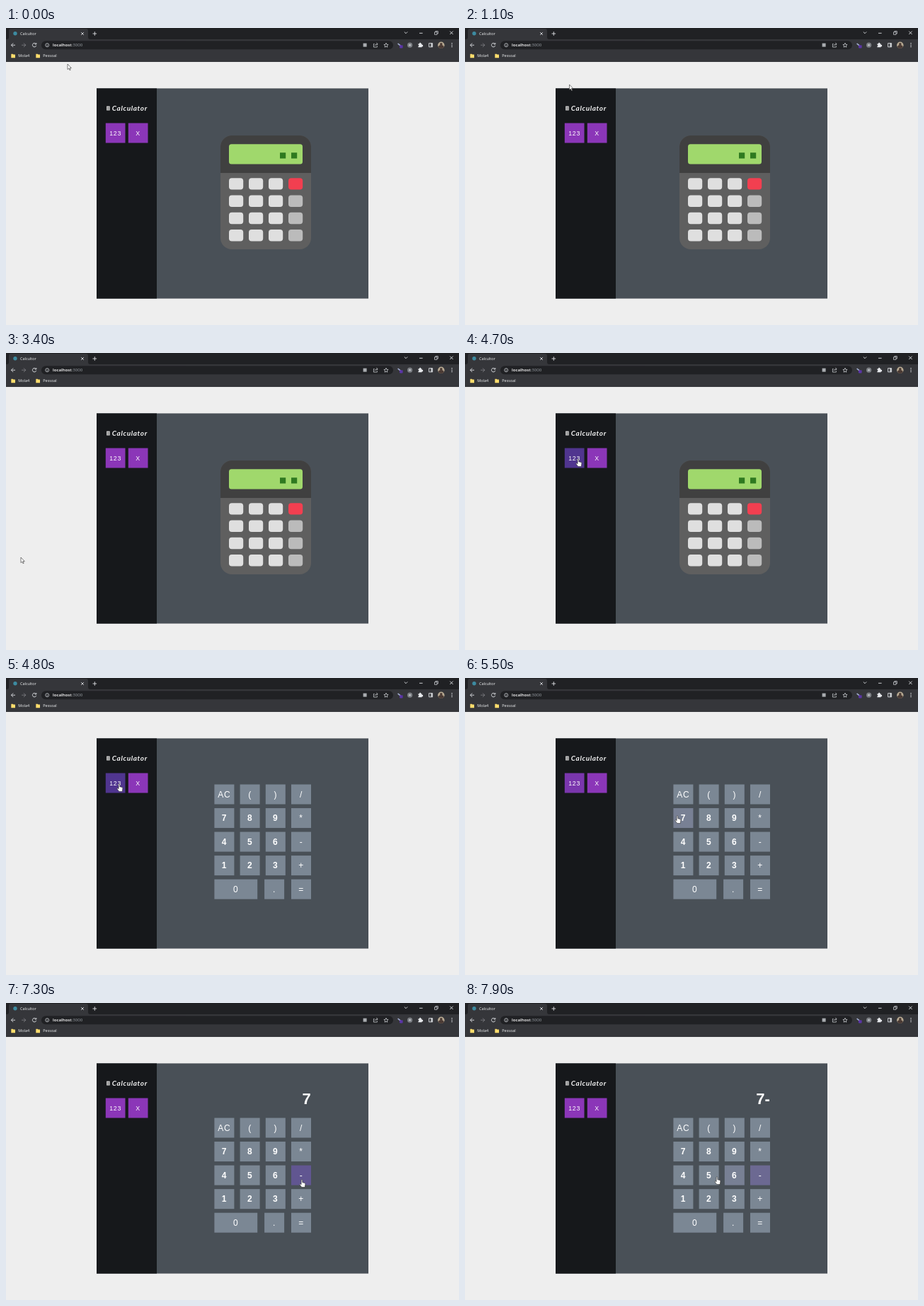
An HTML page for the animation above (8 s loop, 640 px wide and 420 px high).

```html
<!DOCTYPE html>
<html lang="en">
<head>
<meta charset="utf-8">
<title>Calculator</title>
<style>
html, body { margin: 0; width: 100%; height: 100%; overflow: hidden; background: #eee; }
svg { display: block; width: 640px; height: 420px; }
.ui { font: 500 5.5px "Open Sans", "Noto Sans", sans-serif; fill: #f1f3f4; }
.url { font-size: 6.1px; font-weight: 600; fill: #fff; }
.icon { fill: none; stroke: #dfe1e5; stroke-width: .9; }
.logo { font: italic 700 10px Lato, sans-serif; letter-spacing: .65px; fill: #f2f2f2; }
.btn { font-family: "Liberation Sans", Arial, sans-serif; fill: #fff; text-anchor: middle; letter-spacing: .7px; }
.display { font: 700 22px "Liberation Sans", Arial, sans-serif; fill: #fff; text-anchor: end; }
</style>
</head>
<body>
<svg viewBox="0 0 640 420">
  <rect width="640" height="420" fill="#eee"/>

  <!-- browser window -->
  <rect width="640" height="48" fill="#35363a"/>
  <rect width="640" height="16" fill="#202124"/>
  <path d="M1 16Q4 16 4 13V4Q4 1 7 1H113Q116 1 116 4V13Q116 16 119 16Z" fill="#35363a"/>
  <circle cx="13" cy="7.8" r="2.7" fill="#3d8ba1"/>
  <rect x="50" y="18.2" width="497" height="12" rx="6" fill="#202124"/>
  <g class="ui">
    <text x="20" y="9.8">Calcultor</text>
    <text class="url" x="66" y="26.2">localhost<tspan fill="#9aa0a6" font-weight="400">:3000</tspan></text>
    <text x="17.3" y="41.3">Mola4</text>
    <text x="52.3" y="41.3">Pessoal</text>
  </g>
  <g fill="#fbdc6c">
    <path id="folder" d="M7.3 36.8H9.8L10.6 37.6H13V42.2H7.3Z"/>
    <use href="#folder" x="35"/>
  </g>
  <g class="icon">
    <path d="M106.2 6.2L109.8 9.8M109.8 6.2L106.2 9.8M125.3 5.2V10.8M122.5 8H128.1"/>
    <path d="M562.8 5.5L565 7.7L567.2 5.5M584 7.3H588.6M627.2 4.6L631.6 9M631.6 4.6L627.2 9"/>
    <path d="M605.5 5.8H609V9.3H605.5ZM606.8 5.6V4.5H610.3V8H609.2" stroke-width=".7"/>
    <path id="back" d="M13 24.2H7.6M10.2 21.4L7.4 24.2L10.2 27"/>
    <use href="#back" transform="translate(35.2) scale(-1 1)" opacity=".4"/>
    <path d="M42.2 22.4A2.7 2.7 0 1 0 42.7 24.9M42.8 21V23H40.6"/>
    <circle cx="58.2" cy="24.2" r="2.5" stroke-width=".7"/>
    <path d="M58.2 23.9V25.7M58.2 22.6V23.2" stroke-width=".7"/>
    <path d="M520.6 22.4H519.4V27H524.4V25.4M521 25Q521.4 22.8 525 22.7M523.4 21L525.2 22.7L523.4 24.4" stroke-width=".7"/>
    <path d="M537 21.2L537.9 23.3L540.1 23.5L538.4 25L538.9 27.2L537 26L535.1 27.2L535.6 25L533.9 23.5L536.1 23.3Z" stroke-width=".7"/>
    <path d="M597.6 21.6H602.6V26.8H597.6ZM600.8 21.6V26.8M601.7 21.6V26.8"/>
  </g>
  <rect x="504.6" y="21.6" width="5" height="5" fill="#a9acb0"/>
  <path d="M553 22.3L554.2 21.4L558 24.6L556.8 25.7Z" fill="#a8b4d8"/>
  <rect x="556" y="24.3" width="4.6" height="4.2" rx="1" fill="#5a35a5"/>
  <circle cx="570.6" cy="24.2" r="3.6" fill="#7c7f84"/>
  <circle cx="570.6" cy="24.2" r="1.4" fill="#bfc2c6"/>
  <path d="M582.4 22.3H584.1A1.1 1.1 0 1 1 586.2 22.3H587.6V24A1.1 1.1 0 1 1 587.6 26V27.3H582.4V25.8A1 1 0 0 0 582.4 23.8Z" fill="#e8eaed"/>
  <circle cx="614.8" cy="24.2" r="4.7" fill="#b7a992"/>
  <path d="M611 27A3.8 3 0 0 1 618.6 27A4.7 4.7 0 0 1 611 27Z" fill="#4a3a34"/>
  <circle cx="614.8" cy="22.8" r="1.8" fill="#4a3a34"/>
  <path d="M630 21.8V26.8" stroke="#dfe1e5" stroke-width="1.5" stroke-linecap="round" stroke-dasharray="0 2.4"/>

  <!-- app -->
  <rect x="128" y="85.4" width="384" height="297.2" fill="#495057"/>
  <rect x="128" y="85.4" width="85" height="297.2" fill="#16181b"/>
  <rect x="142" y="110.6" width="4.8" height="5.8" rx=".5" fill="#c9c9c9"/>
  <path d="M142.6 112.6H146.2M142.6 114.6H146.2" stroke="#444" stroke-width=".6"/>
  <text class="logo" x="149.8" y="117">Calculator</text>
  <g id="menu"></g>

  <g id="picture">
    <rect x="303" y="152" width="128" height="161" rx="16" fill="#5f5f5f"/>
    <path d="M303 205V168A16 16 0 0 1 319 152H415A16 16 0 0 1 431 168V205Z" fill="#404040"/>
    <rect x="315" y="164.2" width="104" height="28.4" rx="3.5" fill="#a0d86c"/>
    <path d="M387 176.2H395.2V184.4H387ZM403 176.2H411.2V184.4H403Z" fill="#2f7a20"/>
  </g>
  <g id="pad"></g>
  <text class="display" id="display" x="430.8" y="143.2"></text>

  <g id="cursor" stroke="#2b2b2b" stroke-width=".6" fill="#fff" stroke-linejoin="round">
    <path id="arrow" d="M0 0V7.6L1.8 6L3 8.7L4.2 8.2L3 5.6H5.3Z"/>
    <path id="hand" d="M-.9 .6A.85 .85 0 0 1 .8 .6V3.7L4 4.5Q5.1 4.9 4.9 6.1L4.3 10.6H-.2L-3 6.9Q-3.3 5.8-2.3 5.7L-.9 6.7Z"/>
  </g>
</svg>
<script>
const LOOP = 8000, STEP = 100, FADE = 500;
const PAD_SHOWN = 4800, FIRST_DIGIT = 6400, MINUS = 7400;
const GREY = [123, 135, 148], PURPLE = [139, 54, 184], HOVER = [80, 53, 143];

// The pointer rests between eased moves: start, end, x, y.
const home = [87, 51];
const moves = [
  [100, 500, 106, 50], [600, 800, 150, 79], [1000, 1200, 145, 81],
  [1500, 2000, 313, 121], [2000, 2600, 312, 76], [2700, 2800, 15, 222],
  [2900, 3100, 21, 289], [3400, 4200, 160, 150], [4900, 5100, 165, 157],
  [5100, 5500, 300, 195], [5500, 5800, 309, 204], [6600, 7100, 418, 250],
  [7500, 7600, 398, 250], [7800, 7900, 356, 246]
];

const $ = id => document.getElementById(id);

function add(parent, tag, attrs, text = "") {
  const el = document.createElementNS("http://www.w3.org/2000/svg", tag);
  for (const name in attrs) el.setAttribute(name, attrs[name]);
  el.textContent = text;
  return parent.appendChild(el);
}

function button(parent, label, x, y, w, size, color, inPad) {
  const h = 28;
  const box = add(parent, "rect", { x, y, width: w, height: h });
  add(parent, "text", {
    class: "btn", x: x + w / 2, y: y + h / 2 + size * .35,
    "font-size": size, "font-weight": inPad && /[1-9]/.test(label) ? 700 : 400
  }, label);
  return { x, y, w, h, box, color, inPad };
}

for (let i = 0; i < 16; i++) {
  const col = i % 4, row = i >> 2;
  add($("picture"), "rect", {
    x: 315 + col * 28, y: 212.2 + row * 24.3, width: 20.2, height: 16.4, rx: 4,
    fill: i === 3 ? "#f23f50" : col === 3 ? "#bbb" : "#dfdfdf"
  });
}

const buttons = ["123", "X"].map((label, i) =>
  button($("menu"), label, 140.8 + i * 32, 134.5, 27.7, 8.8, PURPLE, false));

["AC()/", "789*", "456-", "123+", "0.="].forEach((line, row) => {
  let x = 294.4;
  for (const label of line.match(/AC|./g)) {
    const w = label === "0" ? 60.8 : 28;
    buttons.push(button($("pad"), label, x, 162.5 + row * 33.55, w, 12, GREY, true));
    x += w + (row < 4 ? 8.2 : 9.9);
  }
});

const ease = k => k * k * (3 - 2 * k);

function pointer(t) {
  let [x, y] = home;
  for (const [from, to, nx, ny] of moves) {
    const k = ease(Math.min(1, Math.max(0, (t - from) / (to - from))));
    x += (nx - x) * k;
    y += (ny - y) * k;
  }
  return [x, y];
}

const padShift = t => t < FIRST_DIGIT ? -12 : 0;

function isOver(b, t, [px, py]) {
  if (b.inPad && t < PAD_SHOWN) return false;
  const y = b.y + (b.inPad ? padShift(t) : 0);
  return px >= b.x && px <= b.x + b.w && py >= y && py <= y + b.h;
}

// Hover strength follows the pointer's recent path.
function hoverLevels(t) {
  const dt = 20, levels = buttons.map(() => 0);
  for (let s = Math.max(0, t - 1200); s < t; s += dt) {
    const p = pointer(s);
    buttons.forEach((b, i) => {
      const change = (isOver(b, s, p) ? dt : -dt) / FADE;
      levels[i] = Math.min(1, Math.max(0, levels[i] + change));
    });
  }
  return levels;
}

const mix = (a, b, k) => `rgb(${a.map((v, i) => Math.round(v + (b[i] - v) * k))})`;
const show = (id, on) => $(id).setAttribute("visibility", on ? "visible" : "hidden");

function draw(t) {
  const p = pointer(t), levels = hoverLevels(t);
  buttons.forEach((b, i) => b.box.setAttribute("fill", mix(b.color, HOVER, levels[i])));
  show("picture", t < PAD_SHOWN);
  show("pad", t >= PAD_SHOWN);
  $("pad").setAttribute("transform", `translate(0 ${padShift(t)})`);
  $("display").textContent = t < FIRST_DIGIT ? "" : t < MINUS ? "7" : "7-";
  const over = buttons.some(b => isOver(b, t, p));
  show("hand", over);
  show("arrow", !over);
  $("cursor").setAttribute("transform", `translate(${p})`);
}

const start = performance.now();
function tick() {
  const t = (performance.now() - start) % LOOP;
  draw(Math.floor(t / STEP) * STEP);
  requestAnimationFrame(tick);
}
tick();
</script>
</body>
</html>
```
